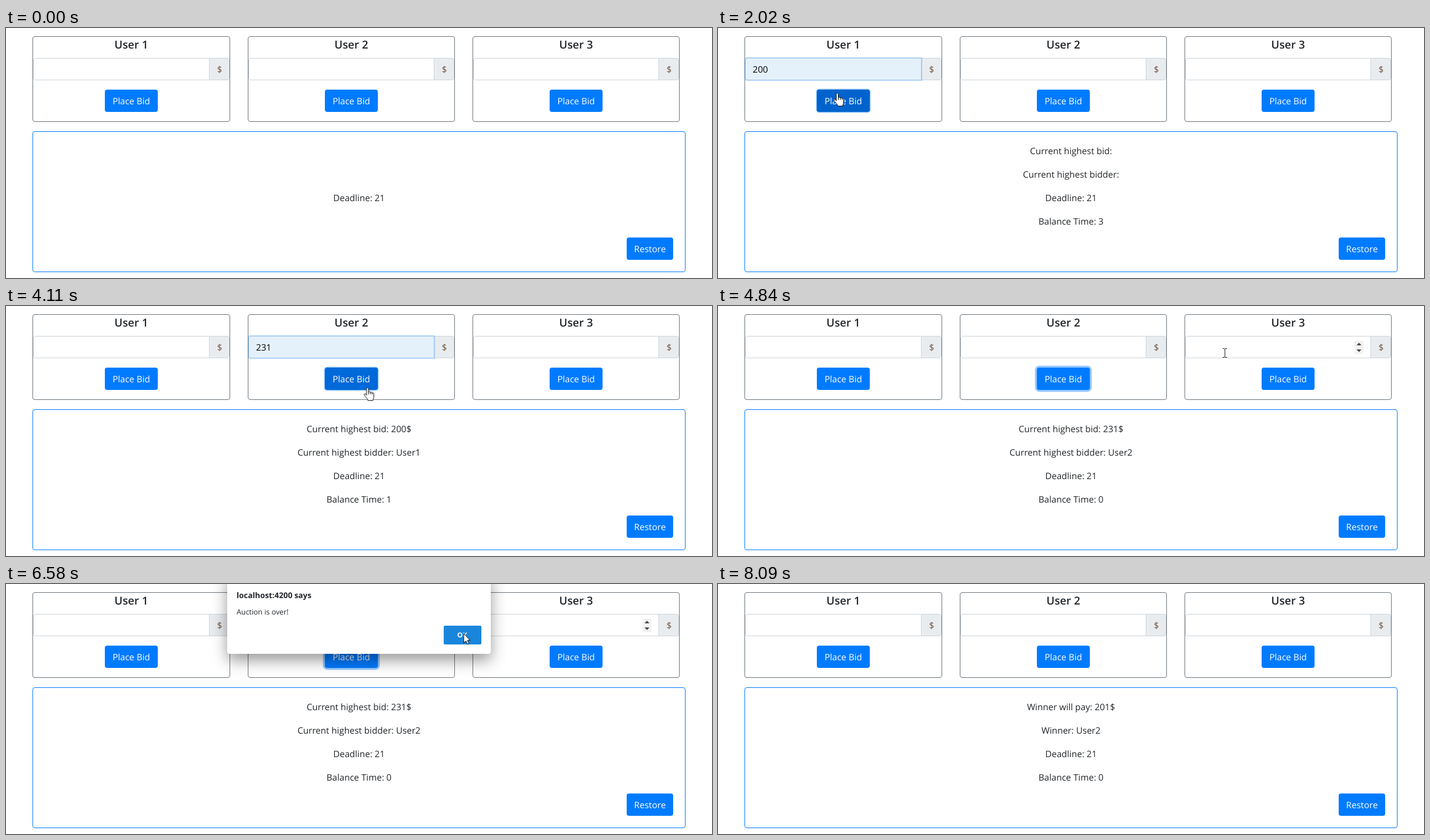
Animation of 1200x426 px, one loop 8.11 s. Source, as an HTML page:

```html
<!DOCTYPE html>
<html lang="en">
<head>
<meta charset="utf-8">
<title>Auction</title>
<style>
  html, body { margin: 0; width: 100%; height: 100%; overflow: hidden; background: #fff; }
  svg { display: block; width: 1200px; height: 426px; }
  text { font: 15.1px "Open Sans", "Noto Sans", sans-serif; fill: #212529; text-rendering: geometricPrecision; }
  .mid { text-anchor: middle; }
  .head { font-size: 18.7px; font-weight: 600; }
  .label { fill: #fff; }
  .unit { fill: #6f5340; }
  .small { font-size: 11.4px; fill: #111; }
  .preview { font-size: 12.6px; fill: #000; }
  .value { fill: #000; }
  .card { fill: #fff; stroke: #6c757d; }
  .panel { fill: #fff; stroke: #007bff; }
  .addon { fill: #e9ecef; stroke: #ced4da; }
  .field { fill: #fff; stroke: #ced4da; }
  .btn { fill: #007bff; }
  .glow { fill: none; stroke: #007bff; stroke-width: 0; stroke-opacity: .25; }
  .btn-glow { stroke: #268fff; stroke-opacity: .5; }
  .menu { filter: drop-shadow(0 6px 7px rgba(0, 0, 0, .35)); }
  .alert { filter: drop-shadow(0 11px 13px rgba(0, 0, 0, .4)); }
  .mark { fill: #e0eefa; stroke: #5a9bd3; }
  .title { font-size: 13.3px; font-weight: 700; }
  .note { font-size: 12.4px; }
  .ok { font-size: 11.6px; font-weight: 700; fill: #fff; }
</style>
</head>
<body>
<svg id="stage" viewBox="0 0 1200 426">
  <defs>
    <clipPath id="clip1"><path d="M41 80H700V426H41z"/></clipPath>
    <clipPath id="clip2"><path d="M390 80H1000V426H390z"/></clipPath>
    <g id="spin">
      <path d="M-7.500 59h15v23h-15z" fill="#eee" opacity=".75"/>
      <path d="M-4 67L0 62.500 4 67zM-4 74L0 78.500 4 74z" fill="#444"/>
    </g>
    <g id="trash" fill="none" stroke="#555">
      <path d="M-6.500 -5.500H6.500M-2.500 -5.500V-7.500H2.500V-5.500M-5 -5.500V7.500H5V-5.500M-2.500 -3V5M0 -3V5M2.500 -3V5"/>
    </g>
  </defs>
</svg>
<script>
const LOOP = 8110;
const stage = document.getElementById('stage');
const $ = id => document.getElementById(id);
const add = markup => stage.insertAdjacentHTML('beforeend', markup);

// Keys are [ms, value, easing towards the next key].
function track(el, prop, keys) {
  const all = [[0, keys[0][1]], ...keys, [LOOP, keys[keys.length - 1][1]]];
  el.animate(
    all.map(([t, v, easing = 'linear']) => ({ offset: Math.min(t / LOOP, 1), [prop]: v, easing })),
    { duration: LOOP, iterations: Infinity });
}

// Ranges are [from, to, fade in, fade out].
function show(id, ...ranges) {
  track($(id), 'opacity', ranges.flatMap(([from, to, fadeIn = 0, fadeOut = 0]) =>
    [[from, 0], [from + fadeIn, 1], [to, 1], [to + fadeOut, 0]]));
}

// Moves a property from rest to another value and back, as a 150 ms transition.
function pulse(id, prop, rest, on, ...ranges) {
  track($(id), prop, ranges.flatMap(([from, to, out = 150]) =>
    [[from, rest, 'ease-in-out'], [from + 150, on], [to, on, 'ease-in-out'], [to + out, rest]]));
}

const button = (id, x, w, y, label) => `
  <rect id="${id}Glow" class="glow btn-glow" x="${x}" y="${y}" width="${w}" height="38" rx="4"/>
  <rect id="${id}" class="btn" x="${x}" y="${y}" width="${w}" height="38" rx="4"/>
  <text class="mid label" x="${x + w / 2}" y="${y + 25}">${label}</text>`;

function card(n, x, w) {
  const mid = x + w / 2, split = x + w - 35.5;
  const field = `M${split} 51.5H${x + 5}q-3.500 0-3.500 3.500v30q0 3.500 3.500 3.500H${split}z`;
  add(`
    <rect class="card" x="${x + .5}" y="14.500" width="${w - 1}" height="145" rx="3.500"/>
    <text class="mid head" x="${mid}" y="35">User ${n}</text>
    <path class="addon" d="M${split} 51.500h30.500q3.500 0 3.500 3.500v30q0 3.500-3.500 3.500h-30.500z"/>
    <text class="mid unit" x="${split + 17.5}" y="76">$</text>
    <path id="ring${n}" class="glow" d="${field}"/>
    <path id="field${n}" class="field" d="${field}"/>
    <use id="spin${n}" href="#spin" x="${split - 20}" opacity="0"/>
    <path id="caret${n}" d="M${x + 14.5} 61v20" stroke="#000" opacity="0"/>
    ${button('btn' + n, mid - 45, 90, 105, 'Place Bid')}`);
}

function states(y, list) {
  list.forEach(([text, from, to], i) => {
    const id = `line${y}-${i}`;
    add(`<text id="${id}" class="mid" x="600" y="${y}">${text}</text>`);
    show(id, [from, to]);
  });
}

// Suggestion list below a field; hovers are [row, from, to].
function menu(n, x, open, pick, hovers) {
  const rows = [200, 134, 231, 2231, 1234];
  const marks = hovers.map(([row], i) => `
    <g id="mark${n}${i}" transform="translate(0 ${row * 34})">
      <rect class="mark" x="${x + 4.5}" y="93.500" width="277" height="33" rx="2"/>
      <use href="#trash" x="${x + 298.5}" y="110"/>
    </g>`).join('');
  add(`
    <g clip-path="url(#clip${n})"><g id="menu${n}">
      <rect class="menu" x="${x}" y="89" width="320" height="178" rx="3" fill="#fff"/>
      ${marks}
      ${rows.map((v, i) => `<text class="small" x="${x + 13}" y="${114.5 + i * 34}">${v}</text>`).join('')}
    </g></g>
    ${hovers.map(([row], i) =>
      `<text id="hint${n}${i}" class="preview" x="${x + 13}" y="75.500">${rows[row]}</text>`).join('')}`);
  show('menu' + n, [open, pick, 120, 80]);
  hovers.forEach(([, from, to], i) => {
    show(`mark${n}${i}`, [from, to]);
    show(`hint${n}${i}`, [from, Math.min(to, pick)]);
  });
}

card(1, 45, 336);
card(2, 411, 352);
card(3, 793, 352);
add('<rect class="panel" x="45.500" y="176.500" width="1109" height="239" rx="3.500"/>');
add(button('restore', 1055, 79, 357, 'Restore'));

// Auction status
const BID1 = 2060, BID2 = 4130, OVER = 6620;
states(215, [
  ['Current highest bid:', 0, BID1],
  ['Current highest bid: 200$', BID1, BID2],
  ['Current highest bid: 231$', BID2, OVER],
  ['Winner will pay: 201$', OVER, LOOP]]);
states(255, [
  ['Current highest bidder:', 0, BID1],
  ['Current highest bidder: User1', BID1, BID2],
  ['Current highest bidder: User2', BID2, OVER],
  ['Winner: User2', OVER, LOOP]]);
add('<text class="mid" x="600" y="295">Deadline: 21</text>');
const ticks = [0, 1150, 1700, 2340, 3240, 4240, LOOP];
states(335, ticks.slice(0, -1).map((t, i) => [`Balance Time: ${5 - i}`, t, ticks[i + 1]]));

// Fields
add(`<text id="value1" class="value" x="59" y="76">200</text>
     <text id="value2" class="value" x="425" y="76">231</text>`);
show('value1', [1800, BID1]);
show('value2', [3450, BID2]);
for (const [n, from, to] of [[1, 1080, 1950], [2, 2400, 4040]]) {
  pulse('ring' + n, 'strokeWidth', '0px', '6.4px', [from, to]);
  pulse('field' + n, 'stroke', '#ced4da', '#80bdff', [from, to]);
}
track($('field1'), 'fill', [[1620, '#fff'], [1620, '#e4f1fb'], [BID1, '#e4f1fb'], [BID1, '#fff']]);
track($('field2'), 'fill', [[2640, '#fff'], [2640, '#e4f1fb'], [BID2, '#e4f1fb'], [BID2, '#fff']]);
show('spin1', [960, 1950]);
show('spin2', [2300, 4040]);
show('spin3', [4700, OVER]);
show('caret1', [1080, 1800]);
show('caret2', [2400, 3450]);

// Buttons
track($('btn1'), 'fill', [
  [820, '#007bff'], [930, '#0069d9'], [940, '#0069d9'], [1080, '#007bff'],
  [1800, '#007bff'], [1940, '#0069d9'], [2010, '#0062cc'], [2110, '#0069d9'], [2250, '#007bff']]);
pulse('btn2', 'fill', '#007bff', '#0069d9', [3740, 4200]);
pulse('btn1Glow', 'strokeWidth', '0px', '6.4px', [1950, 2400]);
pulse('btn2Glow', 'strokeWidth', '0px', '6.4px', [4040, 7970, 120]);

menu(1, 46, 1200, 1800, [[0, 1620, 1900]]);
menu(2, 412, 2480, 3450, [[0, 2640, 2850], [1, 2850, 3070], [2, 3070, 3550]]);

// Browser dialog
add(`<g id="alert">
  <path class="alert" d="M376 -20H824V115q0 4-4 4H380q-4 0-4-4z" fill="#fff"/>
  <text class="title" x="392" y="24">localhost:4200 says</text>
  <text class="note" x="392" y="52">Auction is over!</text>
  <rect id="okBtn" x="744" y="71" width="64" height="32" rx="2" fill="#0078d7"/>
  <text class="mid ok" x="775.500" y="91">OK</text>
</g>`);
show('alert', [5200, 6600, 170, 200]);
track($('okBtn'), 'fill', [[5840, '#0078d7'], [5840, '#1a86db'], [LOOP, '#1a86db']]);

// Mouse pointer
add(`<g id="pointer" fill="#fff" stroke="#000">
  <path id="arrow" d="M.500 .500V16.500L4.200 13 6.800 18.800 9.300 17.700 6.900 12H11.500z"/>
  <path id="hand" transform="translate(-6.500 0)" d="M5 13.500V2.500C5 0 8.500 0 8.500 2.500V8.500C9 7 11.800 7.200 12 9c.800-1.300 3-.900 3 .800 1-1 2.500-.400 2.500 1.500V16c0 2-1.500 3.500-1.500 6.500H7.500C7.500 19 1 14.500 1 12.300 1 10.500 3.500 10.500 5 13.500zM8.500 8.500V12M12 9V12M15 10V12"/>
  <path id="beam" fill="none" d="M-3.500 -7.500H-1L0 -6.500 1 -7.500H3.500M0 -6.500V6.500M-3.500 7.500H-1L0 6.500 1 7.500H3.500"/>
</g>`);
track($('pointer'), 'transform', [
  [210, 954, 422], [500, 640, 300], [800, 255, 150], [900, 235, 118, 'ease-out'],
  [1020, 230.5, 71], [1550, 230.5, 71, 'ease-in-out'], [1780, 203, 112],
  [1960, 202.5, 110.5], [2060, 202.5, 110.5, 'ease-in-out'], [2350, 575.5, 72],
  [2520, 575.5, 72], [2700, 566, 105], [2870, 559, 129], [3100, 560, 165],
  [3450, 560, 172, 'ease-in-out'], [3950, 606, 130], [4020, 606, 130], [4110, 614, 138.5],
  [4300, 640, 148, 'ease-in-out'], [4840, 861.5, 80], [5200, 861.5, 80, 'ease-in-out'],
  [5380, 841.5, 126], [5620, 841.5, 126, 'ease-in-out'], [5930, 777.5, 84],
  [7170, 777.5, 84, 'ease-in'], [7590, 955, 428]
].map(([t, x, y, ease]) => [t, `translate(${x}px, ${y}px)`, ease]));
show('arrow', [210, 820], [940, 960], [1600, 1800], [2110, 2300], [2560, 3740], [4200, 4700], [5640, 7590]);
show('hand', [820, 940], [1800, 2110], [3740, 4200]);
show('beam', [960, 1600], [2300, 2560], [4700, 5640]);
</script>
</body>
</html>
```
